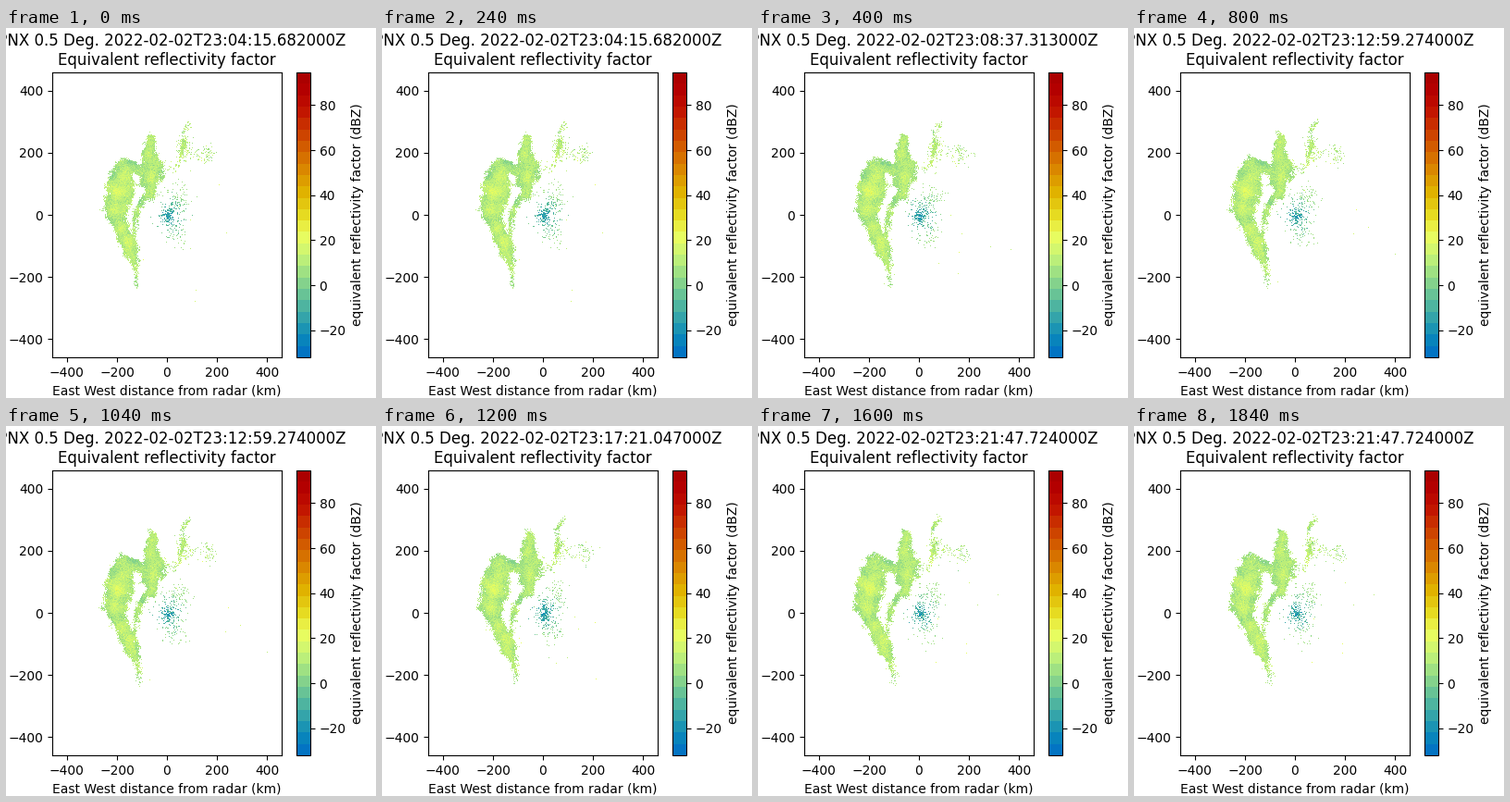
A matplotlib script for the animation above (2000 ms loop, 400 by 400 pixels).

```python
import numpy as np
import matplotlib.pyplot as plt
from matplotlib.animation import FuncAnimation
from matplotlib.colors import ListedColormap

W, H = 248, 308          # plot area in pixels
X0, Y0 = 50, 48          # its top left corner on the stage
FRAMES, STEP = 5, 400
VMIN, VMAX = -32, 94.5
LEVELS = 25
REACH = 459.08           # radar range in km
RADAR = (175, 203)

TIMES = ["23:04:15.682", "23:08:37.313", "23:12:59.274",
         "23:17:21.047", "23:21:47.724"]

# Echo bands as (x, y, radius) along a spine, in stage pixels
WEST = [(128, 152, 11), (124, 172, 15), (119, 195, 13), (122, 210, 9),
        (130, 228, 9), (135, 240, 8), (140, 256, 3), (142, 277, 1.5)]
EAST = [(155, 118, 3), (156, 138, 10), (158, 151, 12), (156, 165, 11),
        (156, 180, 6), (149, 185, 3), (142, 196, 3), (138, 214, 2.5),
        (137, 232, 2)]
BRIDGE = [(134, 150, 7), (149, 155, 6)]
HOOK = [(198, 103, 0), (190, 114, 0), (191, 130, 0), (187, 144, 0),
        (181, 155, 0)]

gx, gy = np.meshgrid(X0 + np.arange(W) + 0.5, Y0 + np.arange(H) + 0.5)


def rainbow(n=15):
    """Rainbow built along a path in YUV space."""
    low = n * 2 // 5
    y = np.r_[np.linspace(0.3, 0.85, low), np.linspace(0.9, 0, n - low)]
    u = 0.4 * np.sin(np.linspace(0.8, 1.8, n) * np.pi)
    v = 0.55 * np.sin(np.linspace(-0.33, 0.33, n) * np.pi) + 0.1
    rgb = np.array([y + 1.13983 * v, y - 0.39465 * u - 0.5806 * v,
                    y + 2.03211 * u]).clip(0, 1)
    at = (np.arange(LEVELS) + 0.5) / LEVELS
    return ListedColormap(
        np.column_stack([np.interp(at, np.linspace(0, 1, n), c) for c in rgb]))


def drifted(band, t, top, bottom):
    """Carry a band sideways by top..bottom pixels and lift its upper end."""
    x, y, r = np.array(band, float).T
    s = (y - y[0]) / (y[-1] - y[0])
    return np.column_stack([x + t * (top + (bottom - top) * s ** 2),
                            y - 3 * t * (1 - s), r])


def depth(band):
    """Distance to the band's rim, positive inside."""
    best = np.full(gx.shape, -1e3)
    for (xa, ya, ra), (xb, yb, rb) in zip(band[:-1], band[1:]):
        dx, dy = xb - xa, yb - ya
        s = ((gx - xa) * dx + (gy - ya) * dy) / (dx * dx + dy * dy)
        s = s.clip(0, 1)
        gap = np.hypot(gx - xa - s * dx, gy - ya - s * dy)
        best = np.maximum(best, ra + s * (rb - ra) - gap)
    return best


def soft_noise(rng, size):
    noise = rng.standard_normal(gx.shape)
    k = np.exp(-0.5 * (np.arange(-3 * size, 3 * size + 1) / size) ** 2)
    for axis in (0, 1):
        noise = np.apply_along_axis(np.convolve, axis, noise, k, "same")
    return noise / noise.std()


def bump(x, y, sx, sy):
    return np.exp(-0.5 * (((gx - x) / sx) ** 2 + ((gy - y) / sy) ** 2))


base = np.random.default_rng(4)
ragged, texture = soft_noise(base, 2), soft_noise(base, 4)


def sweep(i):
    t = i / (FRAMES - 1)
    rng = np.random.default_rng(20 + i)
    white, chance = rng.standard_normal(gx.shape), rng.random(gx.shape)
    edge, tone = np.roll(ragged, i, 1), np.roll(texture, i, 1)
    data = np.full(gx.shape, np.nan)

    # clutter around the radar
    clutter = (0.65 * bump(*RADAR, 3.5, 5) + 0.17 * bump(177, 203, 8, 13)
               + 0.2 * bump(187, 184, 6, 9) + 0.1 * bump(184, 223, 6, 9))
    far = np.hypot(gx - RADAR[0], gy - RADAR[1])
    hit = chance < clutter
    data[hit] = (-17 + 0.85 * far + 4 * white).clip(-30, 7)[hit]

    # broken echoes to the north east
    hook = depth(drifted(HOOK, t, -3, 2))
    sparse = (0.7 * np.exp(-(hook / 2.2) ** 2)
              + (0.75 - 0.35 * t) * bump(191, 131, 3.5, 7)
              + 0.25 * bump(206, 136, 9, 4) + 0.25 * bump(218, 138, 5, 6)
              + 0.2 * bump(178, 152, 7, 3))
    hit = chance < sparse * (0.8 + 0.35 * edge)
    data[hit] = (9 + 2 * tone + 3 * white)[hit]

    # main echoes
    inner = np.maximum.reduce([depth(drifted(WEST, t, -2, 6)),
                               depth(drifted(EAST, t, 4, 1)),
                               depth(BRIDGE)])
    hit = inner + 1.2 * edge + 1.3 * white > 0
    level = 6 + 0.65 * inner.clip(0, 12) + 2.2 * tone + 2.4 * white
    data[hit] = level.clip(1, 24)[hit]

    # a few stray gates
    for x, y in rng.normal((200, 225), (32, 38), (8, 2)).astype(int):
        data[(y - Y0) % H, (x - X0) % W] = 8 + 14 * rng.random()
    return data


sweeps = [sweep(i) for i in range(FRAMES)]

fig, ax = plt.subplots(figsize=(4, 4), dpi=100)
image = ax.imshow(sweeps[0], cmap=rainbow(), vmin=VMIN, vmax=VMAX,
                  extent=(0.01 - REACH, REACH, -REACH, REACH), aspect="auto",
                  interpolation="nearest")
ax.set_xlabel("East West distance from radar (km)")
title = ax.set_title("")
bar = fig.colorbar(image, ax=ax)
bar.set_label("equivalent reflectivity factor (dBZ)")


def draw(i):
    image.set_data(sweeps[i])
    title.set_text(f"TPNX 0.5 Deg. 2022-02-02T{TIMES[i]}000Z\n"
                   "Equivalent reflectivity factor")
    return image, title


anim = FuncAnimation(fig, draw, frames=FRAMES, interval=STEP,
                     init_func=lambda: draw(0), repeat=True, repeat_delay=0)
plt.show()
```
